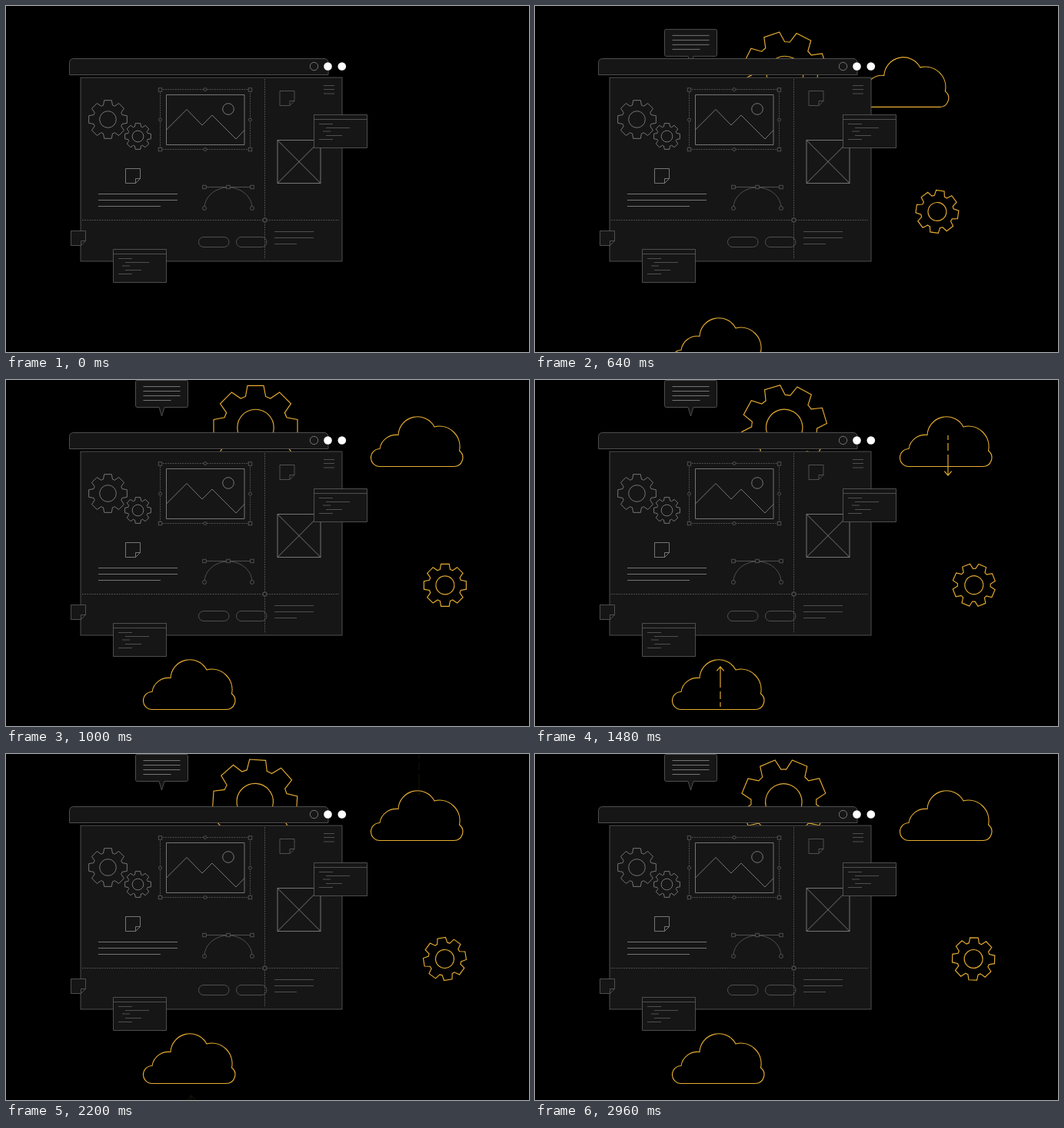
Recreate the animation shown at these times as an HTML page. Size 680x450 px, loop 3 s.

```html
<!DOCTYPE html>
<html lang="en">
<head>
<meta charset="utf-8">
<title>Wireframe window</title>
<style>
  html, body { margin: 0; width: 100%; height: 100%; overflow: hidden; background: #000; }
  svg { display: block; }
  .panel { fill: #161616; stroke: #5a5a5a; }
  .dim { fill: none; stroke: #5a5a5a; }
  .bright { fill: none; stroke: #868686; }
  .gold { fill: none; stroke: #e6ad32; stroke-width: 1.15; }
  .dash { stroke-dasharray: 2 1.2; }
  .bright, .dim, .panel { stroke-width: .85; }
</style>
</head>
<body>
<svg id="stage" width="680" height="450" viewBox="0 0 680 450">
  <defs>
    <path id="cloud" d="M190 428.5A11.5 11.5 0 0 1 190 405.5A21.5 21.5 0 0 1 214 387.5A25 25 0 0 1 261 377A26.5 26.5 0 0 1 293.5 408A11.5 11.5 0 0 1 286.5 428.5Z"/>
    <path id="arrow" d="M-4.7 5.5L0 0L4.7 5.5M0 0V27M0 32V42M0 46V52"/>
    <path id="note" d="M.5 .5h19v13l-6 6h-13zM13.5 19.5v-6h6"/>
    <g id="card">
      <path class="panel" d="M.5 .5h69v43h-69zM.5 6.5h69"/>
      <path class="dim" d="M7 12.5h18M16 17.5h31M12 22h10M16 27.5h21M7 32.5h18"/>
    </g>
  </defs>

  <g id="bigGear" class="gold"></g>
  <g id="smallGear" class="gold"></g>
  <use id="rightCloud" href="#cloud" class="gold"/>
  <use id="lowCloud" href="#cloud" class="gold"/>
  <use id="downArrow" href="#arrow" class="gold"/>
  <use id="upArrow" href="#arrow" class="gold"/>
  <g id="bubble">
    <path class="panel" d="M170.5 .5h64a2 2 0 0 1 2 2v31a2 2 0 0 1-2 2h-28.500l-3.500 11.500l-3.500-11.500h-28.500a2 2 0 0 1-2-2v-31a2 2 0 0 1 2-2z"/>
    <path class="bright" d="M178.500 8.500h48M178.500 14.500h48M178.500 20.500h48M178.500 26.500h36"/>
  </g>

  <path class="panel" d="M82.500 89.500V73.500a5 5 0 0 1 5-5H414a5 5 0 0 1 5 5V89.500z"/>
  <rect class="panel" x="97" y="93" width="340" height="239"/>
  <circle class="bright" cx="400.5" cy="78.500" r="5.200"/>
  <circle cx="418.500" cy="78.500" r="5.300" fill="#fff"/>
  <circle cx="436.800" cy="78.500" r="5.300" fill="#fff"/>

  <path class="dim dash" d="M336.500 95V329M99 278.500H433M200.500 108.500h117v78h-117z"/>
  <g id="handles" class="panel"></g>

  <g id="panelGears" class="bright"></g>
  <g class="bright">
    <path d="M208.500 115.500H310V180.500H208.500zM208.500 161L235 134.500L255 155L268 142L299 173L310 161.500"/>
    <circle cx="289" cy="134" r="7.300"/>
    <path d="M353 174.500h56v56h-56zl56 56m0-56l-56 56"/>
    <path d="M120 244.500H223M120 252.500H223M120 260.500H201"/>
    <use href="#note" x="155" y="211"/>
  </g>
  <g class="dim">
    <path d="M413 103.500h14M413 108.500h14M413 114h14"/>
    <path d="M349 293.500h51M349 301.500h51M349 309.500h29"/>
    <rect x="250.500" y="300.500" width="39.500" height="13" rx="6.500"/>
    <rect x="299.500" y="300.500" width="39.500" height="13" rx="6.500"/>
    <use href="#note" x="355.500" y="110"/>
  </g>
  <use href="#note" class="panel" x="84" y="292"/>
  <use href="#card" x="400" y="141"/>
  <use href="#card" x="139" y="316"/>
</svg>
<script>
const LOOP = 3000, STEP = 40, ENTER = 1000;
const el = id => document.getElementById(id);
const clamp = x => Math.min(1, Math.max(0, x));
const smooth = x => (x = clamp(x), x * x * (3 - 2 * x));
const move = (id, x, y, extra = '') =>
  el(id).setAttribute('transform', `translate(${x} ${y}) ${extra}`);

// Eight-toothed gear with a round hole, centred on (x, y)
function gear(r, x = 0, y = 0) {
  const at = (deg, k) => {
    const a = deg * Math.PI / 180;
    return `${(x + r * k * Math.sin(a)).toFixed(2)} ${(y - r * k * Math.cos(a)).toFixed(2)}`;
  };
  const root = r * .765;
  let d = '';
  for (let a = 0; a < 360; a += 45) {
    d += a ? `A${root} ${root} 0 0 1 ` : 'M';
    d += `${at(a - 18, .765)}L${at(a - 10.900, 1)}L${at(a + 10.900, 1)}L${at(a + 18, .765)}`;
  }
  d += `A${root} ${root} 0 0 1 ${at(-18, .765)}Z`;
  return `<path d="${d}"/><circle cx="${x}" cy="${y}" r="${r * .427}"/>`;
}

const square = ([x, y]) => `<rect x="${x - 2.250}" y="${y - 2.250}" width="4.500" height="4.500"/>`;
const dot = ([x, y], r) => `<circle cx="${x}" cy="${y}" r="${r}"/>`;

el('bigGear').innerHTML = gear(55.500);
el('smallGear').innerHTML = gear(28);
el('panelGears').innerHTML = gear(25.300, 132.500, 147.500) + gear(17.200, 171.500, 169.500);
el('handles').innerHTML =
  '<path d="M258 235.500H320M258 263C258 248 272 236 289 236S320 248 320 263" fill="none"/>' +
  [[200.500, 109], [317.500, 109], [200.500, 186.500], [317.500, 186.500], [336.500, 278.500],
   [258, 235.500], [289, 235.500], [320, 235.500]].map(square).join('') +
  [[259, 108.500], [259, 186.500], [200.500, 148], [317.500, 148]].map(p => dot(p, 2)).join('') +
  [[258, 263], [320, 263]].map(p => dot(p, 2.500)).join('');

function drawArrows(t) {
  const second = t >= 1990;
  const p = clamp((t - (second ? 1990 : ENTER)) / 1000);
  const shift = 200 * smooth(p);
  const opacity = smooth((p - .18) / .16) * smooth((.85 - p) / .2);
  move('upArrow', 241, 467 - shift);
  move('downArrow', 537, 30 + shift, 'scale(1 -1)');
  for (const id of ['upArrow', 'downArrow']) el(id).setAttribute('opacity', opacity);
}

function draw(t) {
  const left = 1 - smooth(t / ENTER);
  const spin = Math.max(0, t - ENTER) / 2000;
  move('bubble', 0, 101 * left);
  move('lowCloud', 0, 142 * left);
  move('rightCloud', 296 - 190 * left, -316 + 64 * left);
  // Each gear turns about a point slightly off its centre
  move('bigGear', 324.300, 63 + 91 * left, `rotate(${90 * left - 69 * spin}) translate(.2 -1.1)`);
  move('smallGear', 570.300 - 162 * left, 267.100, `rotate(${180 * left - 90 * spin}) translate(.6 -.2)`);
  drawArrows(t);
}

const start = performance.now();
function tick() {
  const t = (performance.now() - start) % LOOP;
  draw(t < 2 * STEP ? 0 : Math.floor(t / STEP) * STEP);
  requestAnimationFrame(tick);
}
tick();
</script>
</body>
</html>
```
